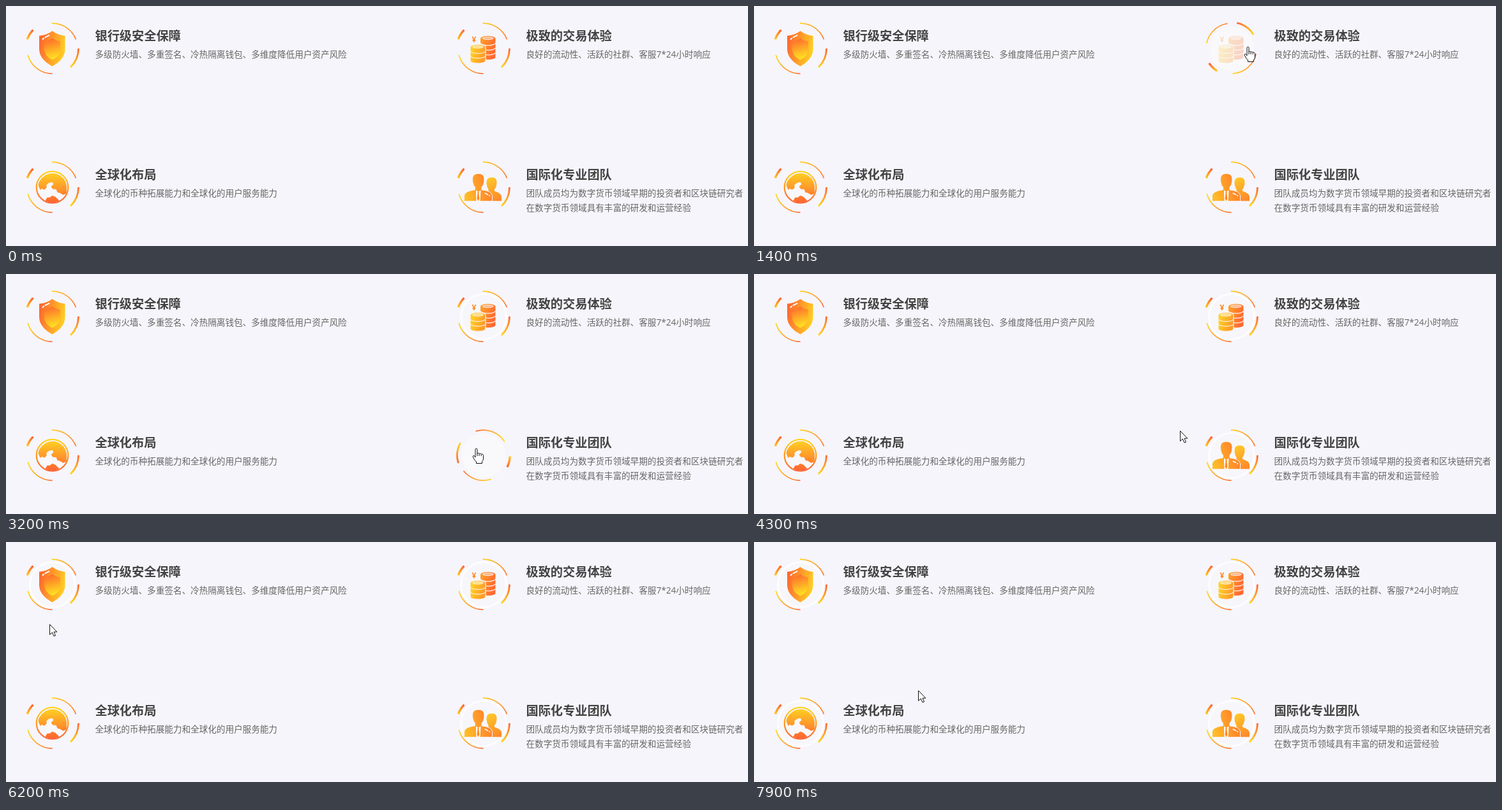
An HTML page that plays this animation: 1162x377 px, repeating every 8000 ms.

```html
<!DOCTYPE html>
<html lang="zh-CN">
<head>
<meta charset="utf-8">
<title>平台优势</title>
<style>
  html, body { margin: 0; width: 100%; height: 100%; overflow: hidden; background: #f6f5fb; }
  svg { display: block; }
  text { font-family: "Open Sans", "Noto Sans CJK SC", "Noto Sans CJK", sans-serif; }
  .title { font-size: 19.2px; font-weight: 700; fill: #424242; }
  .note { font-size: 13.6px; fill: #666; }
</style>
</head>
<body>
<svg id="stage" width="1162" height="377" viewBox="0 0 1162 377">
  <defs>
    <linearGradient id="globeFill" gradientUnits="userSpaceOnUse" x1="0" y1="-26" x2="0" y2="26">
      <stop offset="0" stop-color="#ffd822"/><stop offset="1" stop-color="#ff5f30"/>
    </linearGradient>
    <linearGradient id="across" x1="0" y1="0" x2="1" y2="0.3">
      <stop offset="0" stop-color="#ffd926"/><stop offset="1" stop-color="#ff9a28"/>
    </linearGradient>
    <linearGradient id="warm" x1="0" y1="0" x2="1" y2="0.4">
      <stop offset="0" stop-color="#ffa428"/><stop offset="1" stop-color="#ff6830"/>
    </linearGradient>
    <linearGradient id="shieldOut" x1="0" y1="0.3" x2="1" y2="0.6">
      <stop offset="0" stop-color="#ff6630"/><stop offset="1" stop-color="#ffd222"/>
    </linearGradient>
    <linearGradient id="shieldIn" x1="0.4" y1="0" x2="0.6" y2="1">
      <stop offset="0" stop-color="#ff6c2c"/><stop offset="0.9" stop-color="#ffdc22"/>
    </linearGradient>
    <linearGradient id="suit" x1="0" y1="0.7" x2="1" y2="0.4">
      <stop offset="0" stop-color="#ffbe26"/><stop offset="1" stop-color="#ff7a2c"/>
    </linearGradient>
    <linearGradient id="suitBack" x1="0.3" y1="0" x2="0.6" y2="1">
      <stop offset="0" stop-color="#ffc626"/><stop offset="1" stop-color="#ff8a2a"/>
    </linearGradient>

    <g id="shield">
      <path fill="url(#shieldOut)" d="M0-27.500C6-23 13-20.500 20-20V1C20 13 11 22 0 28C-11 22-20.500 13-20.500 1V-20C-13-20.500-6-23-0-27.500Z"/>
      <path fill="url(#shieldIn)" d="M0-16C4-13 8-11.500 12.500-11V1C12.500 9 7 14.500 0 18C-7 14.500-12.500 9-12.500 1V-11C-8-11.500-4-13 0-16Z"/>
      <path fill="none" stroke="#fff" stroke-width="2" stroke-linecap="round" d="M-15-14.500L-13.500-16M-11-17.500L-5-20.500"/>
    </g>

    <g id="coins">
      <text x="-18" y="-10" font-size="12" font-weight="700" fill="#ff8a2c">¥</text>
      <path fill="url(#warm)" d="M-4.500-16A11.800 4 0 0 1 19-16V14A11.800 4 0 0 1-4.500 14Z"/>
      <ellipse cx="7.300" cy="-16" rx="8.500" ry="2" fill="#ffb78a" stroke="#fdeee4"/>
      <path fill="none" stroke="#fdeee4" stroke-width="1.200" d="M-4.500-8.500A11.800 4 0 0 0 19-8.500M-4.500-1A11.800 4 0 0 0 19-1M-4.500 6.500A11.800 4 0 0 0 19 6.500"/>
      <path fill="url(#across)" stroke="#f6f5fb" stroke-width="1.200" d="M-20.500-2.500A12 4 0 0 1 3.500-2.500V19.500A12 4 0 0 1-20.500 19.500Z"/>
      <ellipse cx="-8.500" cy="-2.500" rx="8.500" ry="2" fill="#ffdc80" stroke="#fff3dc"/>
      <path fill="none" stroke="#fff3dc" stroke-width="1.200" d="M-20 5A12 4 0 0 0 3 5M-20 12.500A12 4 0 0 0 3 12.500"/>
    </g>

    <g id="globe">
      <circle r="24.800" fill="#f8f7fb" stroke="url(#globeFill)" stroke-width="2.200"/>
      <path fill="url(#globeFill)" d="M-22-3L-21-8L-17-14L-11-19A22.500 22.500 0 0 1 22.500 3L22 10L17 12L12 9L8 8L6 3L1 3L-2-1L2-5L0-8L-5-7L-9-4L-9 1L-13 4L-16 2L-19 4Z"/>
      <path fill="url(#globeFill)" d="M-11 21L-8 16L-4 16L0 13L5 15L8 18L11 21Q0 27-11 21Z"/>
    </g>

    <g id="team">
      <path fill="url(#suitBack)" d="M5-8Q5-15.500 13-15.500Q21-15.500 21-8Q21-1 17.500 3V6Q28 9 28.500 15V21.500H8V3Q5-1 5-8Z"/>
      <path fill="url(#suit)" stroke="#f6f5fb" d="M-17-13Q-17-21.500-8-21.500Q1.500-21.500 1.500-13Q1.500-4-2.500 0V4Q13 6 14 13V22H-30V13Q-29 6-13 4V0Q-17-4-17-13Z"/>
      <path fill="#fff" d="M-11.500 4.500L-8 7.500L-4 4.500L-5 21.500H-11Z"/>
      <path fill="#ff8a2a" d="M-9.500 7.500H-6.500L-7 10L-6 18L-8 21.500L-10 18L-9 10Z"/>
      <path fill="none" stroke="#fff" stroke-width="1.800" stroke-linecap="round" d="M3 9.500L7 11.500M9.500 13L10 13.500"/>
    </g>
  </defs>

  <g id="items"></g>

  <g id="arrow">
    <path fill="#fff" stroke="#111" d="M.5.5V16.500L4.300 13L7 19L9.500 18L7 12.200H11.800Z"/>
  </g>
  <g id="hand">
    <path fill="#fff" stroke="#111" stroke-linejoin="round" d="M-2 14V1.500Q-2 .2-.5.2Q1 .2 1 1.500V8Q2.500 6.300 4 8.300Q5.700 7 7.200 9Q9.500 8 10.500 10.500V16Q10.500 19 8.500 20.500V23.500H-.500V21Q-3 19-5.500 14Q-6.300 11.800-5 11.300Q-3.500 11-2 14Z"/>
    <path fill="none" stroke="#111" d="M1 7.500V12M4 8.500V12M7.200 9.500V12"/>
  </g>
</svg>

<script>
const NS = "http://www.w3.org/2000/svg";
const LOOP = 8000, STEP = 100, SPIN = 960;
const $ = id => document.getElementById(id);

function add(parent, tag, attrs, content) {
  const el = document.createElementNS(NS, tag);
  for (const key in attrs) el.setAttribute(key, attrs[key]);
  if (content) el.textContent = content;
  parent.appendChild(el);
  return el;
}

const polar = (r, deg) => {
  const a = deg * Math.PI / 180;
  return [r * Math.cos(a), r * Math.sin(a)];
};

// Arcs run clockwise: radius, from, to, width, first and last colour
const ARCS = [
  [39.6, -91, -21, 1.6, "#ffd21f", "#ff7430"],
  [41, 0, 46, 2.8, "#ff6630", "#ffd81f"],
  [39.6, 90, 165, 1.7, "#ff6b2e", "#ffdc1f"],
  [41.8, 200, 224, 3.4, "#ffc81f", "#ff6030"]
];

ARCS.forEach(([r, from, to, , c1, c2], i) => {
  const [x1, y1] = polar(r, from), [x2, y2] = polar(r, to);
  const grad = add(document.querySelector("defs"), "linearGradient",
    { id: "arc" + i, gradientUnits: "userSpaceOnUse", x1, y1, x2, y2 });
  add(grad, "stop", { offset: 0, "stop-color": c1 });
  add(grad, "stop", { offset: 1, "stop-color": c2 });
});

function drawRing(parent) {
  const ring = add(parent, "g", {});
  ARCS.forEach(([r, from, to, width], i) => {
    add(ring, "path", {
      d: `M${polar(r, from)}A${r} ${r} 0 0 1 ${polar(r, to)}`,
      fill: "none", stroke: `url(#arc${i})`, "stroke-width": width
    });
  });
  return ring;
}

const items = [
  { x: 73, y: 67, icon: "shield", start: 4645, title: "银行级安全保障",
    notes: ["多级防火墙、多重签名、冷热隔离钱包、多维度降低用户资产风险"] },
  { x: 748, y: 67, icon: "coins", start: 937, title: "极致的交易体验",
    notes: ["良好的流动性、活跃的社群、客服7*24小时响应"] },
  { x: 73, y: 285, icon: "globe", start: 6345, title: "全球化布局",
    notes: ["全球化的币种拓展能力和全球化的用户服务能力"] },
  { x: 748, y: 285, icon: "team", start: 2941, title: "国际化专业团队",
    notes: ["团队成员均为数字货币领域早期的投资者和区块链研究者",
            "在数字货币领域具有丰富的研发和运营经验"] }
];

for (const item of items) {
  const { x, y, icon, title, notes } = item;
  const g = add($("items"), "g", { transform: `translate(${x} ${y})` });
  item.disc = add(g, "circle", { r: 35, fill: "#f9f9fc" });
  item.halo = add(g, "circle", { r: 35.5, fill: "none", stroke: "#fff", "stroke-width": 2.5 });
  const mark = add(g, "g", { transform: "translate(-.5 -.3)" });
  item.ring = drawRing(mark);
  item.art = add(mark, "use", { href: "#" + icon });
  add(g, "text", { class: "title", x: 66.5, y: -13 }, title);
  notes.forEach((line, i) => add(g, "text", { class: "note", x: 66.5, y: 14.2 + 23 * i }, line));
}

// Pointer stops: time, x, y
const PATH = [
  [400, 1070, 84], [700, 910, 74], [900, 800, 66], [1000, 774, 64], [2200, 774, 64],
  [2300, 742, 79], [2600, 740, 140], [2900, 738, 246], [3100, 737, 274], [3200, 737, 274],
  [3400, 740, 282], [4200, 740, 282],
  [4300, 667, 246], [4600, 170, 92], [4800, 90, 76], [5100, 74, 73], [5900, 74, 73],
  [6200, 68, 129], [6400, 67, 250], [6800, 67, 277], [7500, 67, 277], [7900, 257, 233]
];

function pointerAt(t) {
  const i = PATH.findIndex(p => p[0] >= t);
  if (i < 1) return i && t > PATH[0][0] ? PATH[PATH.length - 1].slice(1) : null;
  const [t0, x0, y0] = PATH[i - 1], [t1, x1, y1] = PATH[i];
  const k = (t - t0) / (t1 - t0);
  return [x0 + (x1 - x0) * k, y0 + (y1 - y0) * k];
}

// cubic-bezier(.25, .1, .25, 1)
function ease(x) {
  const curve = (a, b, u) => 3 * (1 - u) ** 2 * u * a + 3 * (1 - u) * u * u * b + u ** 3;
  let lo = 0, hi = 1;
  for (let i = 0; i < 24; i++) {
    const mid = (lo + hi) / 2;
    if (curve(0.25, 0.25, mid) < x) lo = mid; else hi = mid;
  }
  return curve(0.1, 1, lo);
}

const clamp = v => Math.max(0, Math.min(1, v));

function drawItem(item, t) {
  const p = (t - item.start) / SPIN;
  const spinning = p >= 0 && p < 1;
  item.ring.setAttribute("transform", `rotate(${spinning ? 360 * ease(p) : 0})`);
  item.art.setAttribute("opacity", spinning ? clamp((p - 0.35) / 0.5) : 1);
  item.disc.setAttribute("opacity", p < 0 ? 0 : spinning ? 1 : 0.5);
  item.halo.setAttribute("opacity", p >= 1 ? 0.85 : 0);
}

function drawPointer(t) {
  const pos = pointerAt(t);
  const over = pos && items.some(i => Math.hypot(pos[0] - i.x, pos[1] - i.y) < 42);
  $("hand").style.display = over ? "" : "none";
  $("arrow").style.display = pos && !over ? "" : "none";
  if (!pos) return;
  const move = `translate(${pos.map(Math.round)})`;
  $("hand").setAttribute("transform", move);
  $("arrow").setAttribute("transform", move);
}

function render(now) {
  const t = Math.floor(now % LOOP / STEP) * STEP;
  items.forEach(item => drawItem(item, t));
  drawPointer(t);
}

const origin = performance.now();
function tick() {
  render(performance.now() - origin);
  requestAnimationFrame(tick);
}
tick();
</script>
</body>
</html>
```
